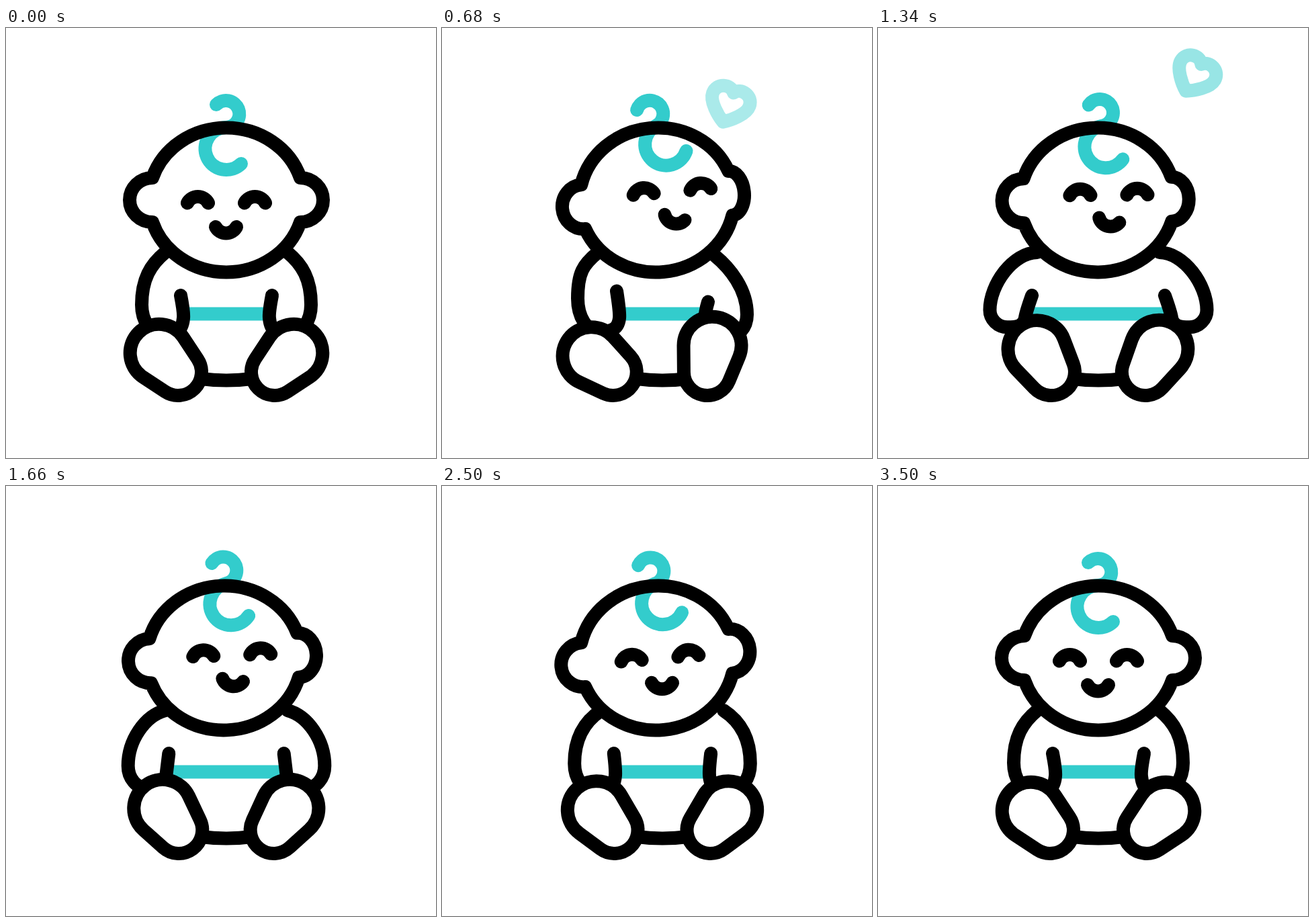
An HTML page for the animation above (3.6 s loop, 640x640 px).

```html
<!DOCTYPE html>
<html lang="en">
<head>
<meta charset="utf-8">
<title>Baby</title>
<style>
html, body { margin: 0; width: 100%; height: 100%; overflow: hidden; background: #fff; }
svg { display: block; width: 100vw; height: 100vh; }
path { fill: none; stroke: #000; stroke-width: 20; stroke-linecap: round; stroke-linejoin: round; }
.teal { stroke: #33cccc; }
.solid { fill: #fff; }
.fill { fill: #fff; stroke: none; }
#belt { stroke-linecap: butt; }
</style>
</head>
<body>
<svg viewBox="0 0 640 640">
  <path id="belt" class="teal" />
  <path d="M290 522Q328 527 366 522" />
  <path id="armL" class="solid" />
  <g transform="translate(656) scale(-1 1)"><path id="armR" class="solid" /></g>
  <path id="legL" class="solid" />
  <g transform="translate(656) scale(-1 1)"><path id="legR" class="solid" /></g>
  <path id="skin" class="fill" />
  <path id="hair" class="teal" d="M-14-40A20 20 0 1 1 0-6A31.5 31.5 0 1 0 23 48" />
  <path id="head" />
  <g id="eyes">
    <path d="M-58 .5A17.5 17.5 0 0 1-27 .5" />
    <path d="M27 .5A17.5 17.5 0 0 1 58 .5" />
  </g>
  <path id="mouth" d="M-15.5 0A17.5 17.5 0 0 0 15.5 0" />
  <path id="heart" class="teal" d="M0 26C-10 20-29 4-29-9C-29-26-8-31 0-20C8-31 29-26 29-9C29 4 10 20 0 26Z" />
</svg>
<script>
const LOOP = 3600, END = 3500, STEP = 20;
const FLAP_START = 1260, FLAP_PERIOD = 530;
const FLAP_END = FLAP_START + 2.5 * FLAP_PERIOD;

const ramp = (t, a, b) => Math.min(1, Math.max(0, (t - a) / (b - a)));
const ease = (t, a, b) => { const u = ramp(t, a, b); return u * u * (3 - 2 * u); };
// Rises from a to b, falls from c to d
const swell = (t, a, b, c, d) => ease(t, a, b) - ease(t, c, d);

const el = id => document.getElementById(id);
const draw = (id, d) => el(id).setAttribute("d", d);
const place = (id, x, y, turn) =>
  el(id).setAttribute("transform", `translate(${x} ${y}) rotate(${turn})`);

// How far the arms are opened from rest: one slow raise, then flapping
function spread(t) {
  if (t < FLAP_START) return 47 * ease(t, 680, FLAP_START);
  if (t < FLAP_END) {
    return 19.5 + 27.5 * Math.cos(2 * Math.PI * (t - FLAP_START) / FLAP_PERIOD);
  }
  return -8 * (1 - ease(t, 2880, END));
}

const wrist = open => 264 - open * 1.27;

// drop: sag on the side the body leans to, lift on the other
function arm(open, drop, shoulder) {
  const x = 202 - open, y = 412 + open * 0.22 + drop * 1.2;
  const inner = wrist(open), base = 456 - open * 0.3 + drop * 0.5;
  const mid = (x + inner) / 2, bend = (mid - x) * 0.55;
  const sy = 334 + Math.max(0, drop) * 0.4;
  return `M${shoulder} ${sy}C${shoulder - 22 - open * 0.4} ${sy + 18 - open * 0.5} ${x} ${y - 38} ${x} ${y}`
    + `C${x} ${y + (base - y) * 0.55} ${mid - bend} ${base} ${mid} ${base}`
    + `C${mid + bend} ${base} ${inner - 2} ${base - 2} ${inner} 432`
    + `Q${inner + 1} 424 ${260 - open * 0.87} ${398 + drop * 0.8}`;
}

// Outline around a large upper and a small lower circle
function leg(deg) {
  const R = 43, r = 35, len = 40, k = deg * Math.PI / 180;
  const lx = 256 + (deg - 45) * 0.15, ly = 512;
  const ux = lx - len * Math.cos(k), uy = ly - len * Math.sin(k);
  const a = Math.acos((R - r) / len);
  const at = (x, y, q, w) => `${x + q * Math.cos(w)} ${y + q * Math.sin(w)}`;
  return `M${at(ux, uy, R, k + a)}A${R} ${R} 0 1 1 ${at(ux, uy, R, k - a)}`
    + `L${at(lx, ly, r, k - a)}A${r} ${r} 0 0 1 ${at(lx, ly, r, k + a)}Z`;
}

function skull(right) {
  const left = 34 - (34 - right) * 0.2;
  return `M-110-33A115.6 107.5 0 0 1 110-33A${right} 33 0 0 1 110 33`
    + `A115.6 107.5 0 0 1-110 33A${left} 33 0 0 1-110-33Z`;
}

function drawHead(glance, first, second) {
  const sway = first + second, tilt = -5.3 * sway;
  const outline = skull(34 - 8.5 * glance - 5 * sway);
  for (const id of ["skin", "head"]) {
    draw(id, outline);
    place(id, 328 - 8.2 * sway, 256, tilt);
  }
  const swirl = -20 * sway - 7.5 * glance;
  place("hair", 327 + 9 * glance - 15 * first - 8 * second,
    154 - 3 * Math.min(1, -swirl / 12), swirl);
  const faceY = -12.8 * glance - 3.8 * sway;
  place("eyes", 328 + 18 * glance - 3.5 * sway, 260 + faceY, tilt * 0.9);
  place("mouth", 327.5 + 19 * glance, 296 + faceY * 0.85, 15 * glance);
}

function drawBody(t, lean) {
  const open = spread(t);
  draw("armL", arm(open, -8 * lean, 237 - 5 * lean));
  draw("armR", arm(open, 12 * lean, 237 + 13 * lean));
  draw("belt", `M${wrist(open)} 425.5H${656 - wrist(open)}`);

  const toddle = 4 - 4 * Math.cos(4 * Math.PI * ramp(t, 1100, 3400));
  draw("legL", leg(45 + toddle - 8.5 * lean + 15 * swell(t, 680, 1020, 1100, 1700)));
  draw("legR", leg(45 + toddle + 34 * swell(t, 150, 680, 680, 1750)));
}

function drawHeart(t) {
  const u = ramp(t, 560, 1460);
  place("heart", 427 + 68 * u ** 3, 118 - 58 * u ** 1.5, 18 + 14 * u);
  el("heart").setAttribute("opacity", ramp(t, 560, 850) - ease(t, 1240, 1440));
}

function render(t) {
  const glance = swell(t, 100, 680, 1080, 2300);
  const first = swell(t, 0, 500, 680, 1200);
  const second = swell(t, 1000, 2500, 2550, 3350);
  drawHead(glance, first, second);
  drawBody(t, first);
  drawHeart(t);
}

const start = performance.now();
function tick() {
  const t = (performance.now() - start) % LOOP;
  render(Math.min(END, Math.floor(t / STEP) * STEP));
  requestAnimationFrame(tick);
}
tick();
</script>
</body>
</html>
```
